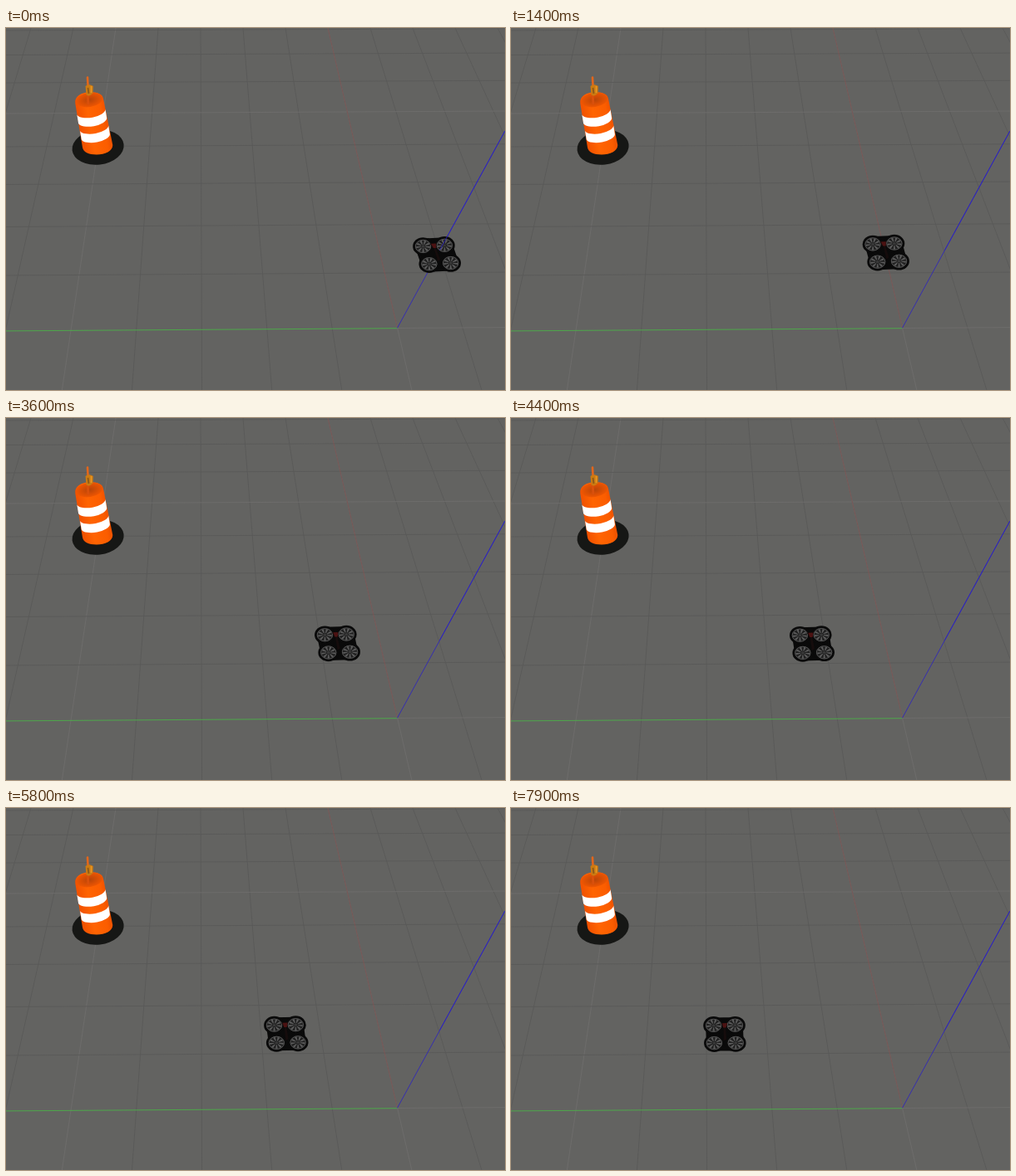
Animation of 600 by 436 pixels, one loop 8000 ms. Source, as an HTML page:

```html
<!DOCTYPE html>
<html lang="en">
<head>
<meta charset="utf-8">
<title>Drone approaching a barrel</title>
<style>
  html, body { margin: 0; width: 100%; height: 100%; overflow: hidden; background: #636361; }
  svg { display: block; width: 600px; height: 436px; }
</style>
</head>
<body>
<svg viewBox="0 0 600 436" fill="none">
  <defs>
    <linearGradient id="shell" gradientUnits="userSpaceOnUse" x1="87" y1="116" x2="126" y2="109">
      <stop offset="0" stop-color="#f05000"/>
      <stop offset=".35" stop-color="#ff6402"/>
      <stop offset=".75" stop-color="#fb5d00"/>
      <stop offset="1" stop-color="#e64c00"/>
    </linearGradient>
    <radialGradient id="shade">
      <stop offset="0" stop-color="#b84408"/>
      <stop offset="1" stop-color="#ee5602"/>
    </radialGradient>
    <path id="stripe" fill="#fff" d="M85.400 104.500A17.500 7.500 -10 0 0 119.500 98L121.200 108.500A17.500 7.500 -10 0 1 87.100 115Z"/>
    <g id="fan">
      <ellipse rx="9.6" ry="8" fill="#202020"/>
      <g transform="scale(1 .83)">
        <circle r="5.600" stroke="#5c5c5c" stroke-width="5.600" pathLength="90" stroke-dasharray="4.600 5.400"/>
        <circle r="9.200" stroke="#6a6a6a" stroke-width=".8"/>
        <circle r="2" fill="#383838"/>
      </g>
    </g>
  </defs>

  <rect width="600" height="436" fill="#636361"/>
  <g id="grid" stroke-width=".9"></g>
  <path d="M387 0 470.500 361" stroke="#7b5251" stroke-width=".8"/>
  <path d="M0 364.900 470.500 361.700" stroke="#4bb048" stroke-width=".9"/>
  <path d="M470.500 361.300 600 124" stroke="#2a20c4" stroke-width=".8"/>

  <g id="barrel">
    <ellipse cx="110.600" cy="143.700" rx="31.200" ry="20.900" fill="#161715" transform="rotate(-7 110.600 143.700)"/>
    <path d="M83.300 91C82 82 91 77.500 101 77.300 111 77.200 116.300 80 117.200 86L128.300 141C128.500 148 119 152.500 109 152.500 99 152.500 92.800 149 92 144Z" fill="url(#shell)"/>
    <ellipse cx="100.400" cy="86.500" rx="16.200" ry="8.600" fill="url(#shade)" transform="rotate(-9 100.400 86.500)"/>
    <use href="#stripe"/>
    <use href="#stripe" transform="translate(3.700 19.400) rotate(0) translate(0 0)"/>
    <path d="M98.300 81 98.800 91" stroke="#d9500c" stroke-width="3" stroke-linecap="round"/>
    <path d="M98 59.500 98.600 70" stroke="#e2661c" stroke-width="2.600" stroke-linecap="round"/>
    <path d="M95.500 70Q100 66.500 104.800 70L104.500 78.500Q100 83.500 96.500 80.500Z" fill="#cc7b12"/>
    <path d="M98.500 72 99.500 79" stroke="#8d5a18" stroke-width="1.800"/>
    <path d="M102.500 70V78" stroke="#e99a26" stroke-width="1.500"/>
  </g>

  <g id="drone">
    <path id="body" fill="#0a0a0a" stroke="#0a0a0a" stroke-width="19" stroke-linejoin="round"/>
    <g id="rotors"></g>
    <g id="nose">
      <path d="M-4 -13 3.500 -13.300 1.500 -8 2 6 -1.500 8 -1 -7Z" fill="#150c0c"/>
      <path d="M-2.500 -13.200 3.500 -13.400 2 -8 -1.500 -8Z" fill="#4c1212"/>
    </g>
  </g>
  <path d="M521.500 267.600 600 124" stroke="#2a20c4" stroke-width=".8"/>
</svg>

<script>
const LOOP = 8000, STEP = 100;
const $ = id => document.getElementById(id);
const add = (parent, tag, attrs) => {
  const el = document.createElementNS('http://www.w3.org/2000/svg', tag);
  for (const key in attrs) el.setAttribute(key, attrs[key]);
  return parent.appendChild(el);
};

// Floor grid: every fifth line is lighter.
const line = (x1, y1, x2, y2, light) =>
  add($('grid'), 'line', { x1, y1, x2, y2, stroke: light ? '#6f6e6c' : '#5a5a58' });

for (let k = -6; k <= 9; k++) {
  const top = 387 - 51 * k, origin = 470.5 - 78.4 * k;
  line(top, 0, top + (origin - top) * 436 / 361, 436, k % 5 === 0);
}
[3, 32.5, 66, 103, 143, 188.5, 239.5, 298].forEach((y, i) =>
  line(0, y, 600, y - 2.2 - i * .25, i === 3));
line(470, 361.5, 600, 360.6, true);

// Time, centre x, centre y
const keys = [
  [0, 518.1, 273], [900, 469, 269.4], [1400, 450.8, 270.6],
  [1800, 442.5, 270.8], [2700, 432, 271.1], [3600, 398.5, 271.5],
  [4400, 362, 272], [5800, 336.8, 272], [6300, 335, 272],
  [6700, 309.9, 272], [7900, 256.9, 272.4]
];

// Monotone cubic through the keys
const secant = (i, c) => (keys[i + 1][c] - keys[i][c]) / (keys[i + 1][0] - keys[i][0]);
function slope(i, c) {
  const last = keys.length - 1;
  if (i === 0) return secant(0, c);
  if (i === last) return secant(last - 1, c);
  const a = secant(i - 1, c), b = secant(i, c);
  return a * b > 0 ? 2 * a * b / (a + b) : 0;
}
function track(t, c) {
  let i = 0;
  while (i < keys.length - 2 && t > keys[i + 1][0]) i++;
  const h = keys[i + 1][0] - keys[i][0];
  const u = Math.min(1, (t - keys[i][0]) / h), v = 1 - u;
  return keys[i][c] * v * v * (1 + 2 * u) + keys[i + 1][c] * u * u * (3 - 2 * u)
    + h * u * v * (slope(i, c) * v - slope(i + 1, c) * u);
}

const corners = [[-1, -1], [1, -1], [1, 1], [-1, 1]];
const rims = corners.map(() => add($('rotors'), 'ellipse', { rx: 12.4, ry: 10.8, fill: '#0a0a0a' }));
const fans = corners.map(() => add($('rotors'), 'use', { href: '#fan' }));

function pose(t) {
  const x = track(t, 1), y = track(t, 2);
  const lean = .0125 * (x - 225);
  const tilt = .1 + .0018 * (x - 257);
  const spots = corners.map(([i, j]) => [i * 12.9 + j * lean, j * 10.6 - i * tilt]);
  $('drone').setAttribute('transform', `translate(${x} ${y})`);
  $('body').setAttribute('d', 'M' + spots.join('L') + 'Z');
  $('nose').setAttribute('transform', `skewX(${Math.atan(lean / 10.6) * 180 / Math.PI})`);
  spots.forEach(([a, b], i) => {
    rims[i].setAttribute('transform', `translate(${a} ${b})`);
    fans[i].setAttribute('transform', `translate(${a} ${b})`);
  });
}

const start = performance.now();
function frame() {
  const t = (performance.now() - start) % LOOP;
  pose(Math.floor(t / STEP) * STEP);
  requestAnimationFrame(frame);
}
frame();
</script>
</body>
</html>
```
